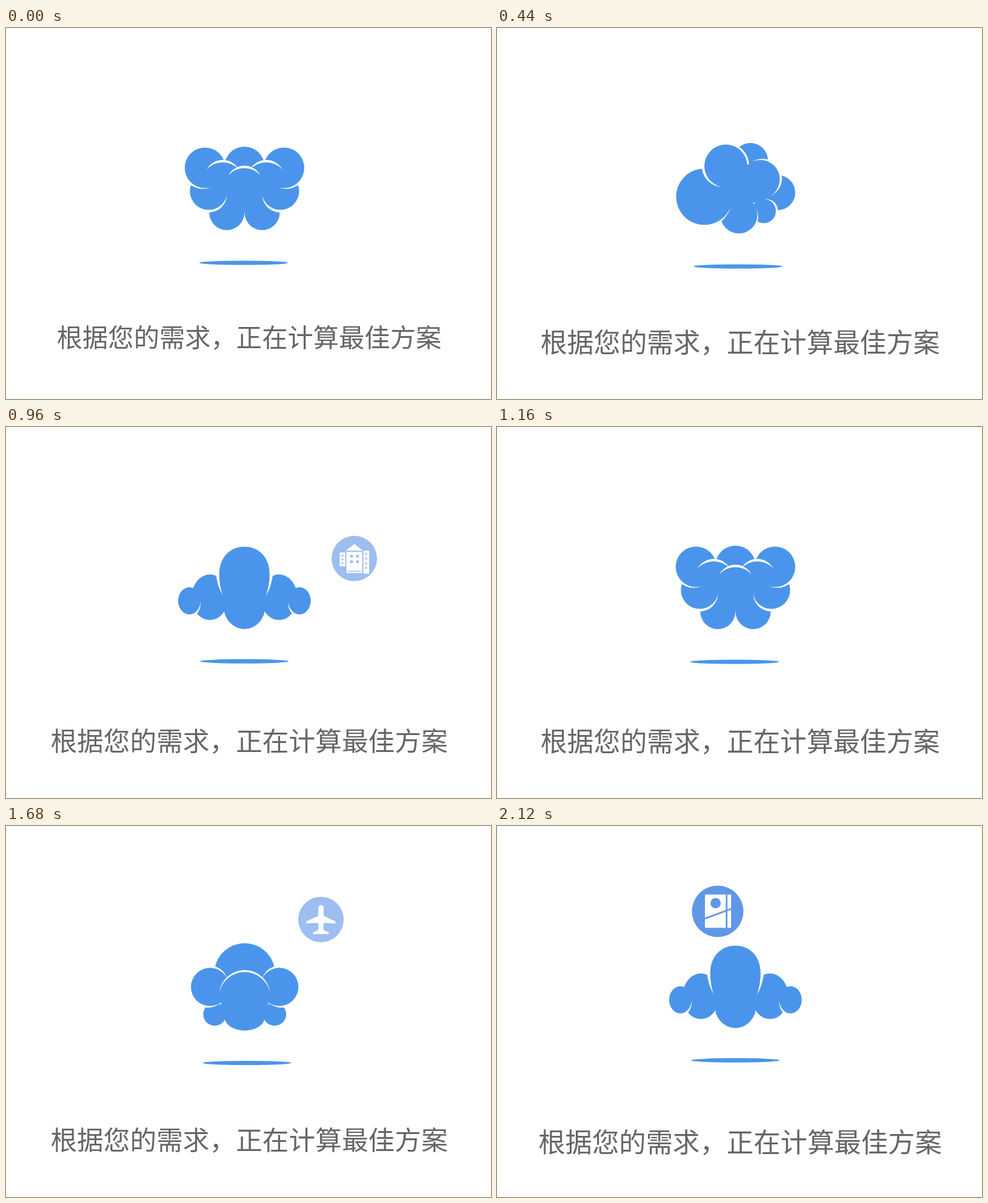
An HTML page with a canvas that plays this animation: 800 by 613 pixels, repeating every 2.16 s.

```html
<!DOCTYPE html>
<html lang="zh-CN">
<head>
<meta charset="utf-8">
<style>
html, body { margin: 0; width: 100%; height: 100%; overflow: hidden; background: #fff; }
canvas { display: block; }
</style>
</head>
<body>
<canvas id="stage" width="800" height="613"></canvas>
<script>
const ctx = document.getElementById('stage').getContext('2d');
const BLUE = '#4a95eb', WHITE = '#fff', ICON_RGB = [78, 139, 228];
const STEP = 40, FRAMES = 54, ICON_FRAMES = 9, POSE_CYCLE = 27;

function oval(x, y, rx, ry = rx, color = BLUE) {
  ctx.fillStyle = color;
  ctx.beginPath();
  ctx.ellipse(x, y, rx, ry, 0, 0, 7);
  ctx.fill();
}
function shape(d, color = BLUE) {
  ctx.fillStyle = color;
  ctx.fill(new Path2D(d));
}
function box(x, y, w, h, color = WHITE, r = 0) {
  ctx.fillStyle = color;
  ctx.beginPath();
  ctx.roundRect(x, y, w, h, r);
  ctx.fill();
}
function line(x0, y0, x1, y1, color, width = 2.5) {
  ctx.strokeStyle = color;
  ctx.lineWidth = width;
  ctx.beginPath();
  ctx.moveTo(x0, y0);
  ctx.lineTo(x1, y1);
  ctx.stroke();
}
// A lobe with a tapering white gap on the side facing the angle (degrees)
function lobe(x, y, rx, angle, gap, ry = rx) {
  const a = angle * Math.PI / 180;
  oval(x + gap * Math.cos(a), y + gap * Math.sin(a), rx, ry, WHITE);
  oval(x, y, rx, ry);
}
// White crescent arching over a horizontal chord
function crescent(x0, x1, y, rise, thick) {
  const half = (x1 - x0) / 2;
  const radius = h => (half * half + h * h) / (2 * h);
  const r1 = radius(rise), r2 = radius(rise - thick);
  shape(`M${x0} ${y}A${r1} ${r1} 0 0 1 ${x1} ${y}A${r2} ${r2} 0 0 0 ${x0} ${y}Z`, WHITE);
}
function mirrored(cx, draw) {
  draw();
  ctx.save();
  ctx.translate(2 * cx, 0);
  ctx.scale(-1, 1);
  draw();
  ctx.restore();
}

function wideCloud() {
  const cx = 393.4;
  oval(cx, 229, 33);
  mirrored(cx, () => {
    oval(364.3, 305, 29);
    oval(357, 249.5, 30);
    lobe(334.3, 269.5, 31, 98, 4.5);
    lobe(328.3, 231, 33.5, 160, 4);
  });
  box(364.5, 240, 58, 65, BLUE);
  box(345, 232, 97, 28, BLUE);
  mirrored(cx, () => crescent(331, 384, 233.5, 15.5, 4));
  crescent(367, 419.5, 243, 15.5, 4);
}

function sideCloud() {
  oval(418, 219, 29);
  oval(463, 272, 29);
  oval(377.5, 228, 38.5, 38.5, WHITE);
  lobe(440, 302.5, 20, 0, 3.5);
  lobe(399, 309, 30.5, 68, 3.5);
  lobe(342, 278.8, 46.5, 110, 5);
  lobe(377.5, 228, 35.5, 188, 4.5);
  lobe(434.5, 250, 32, -27, 4);
  oval(405, 265, 30);
  oval(428, 276, 13);
}

function domeCloud() {
  const cx = 393.7;
  oval(cx, 243.7, 50);
  oval(cx, 281, 41);
  mirrored(cx, () => oval(344.3, 311, 19));
  oval(cx, 316, 33.2, 22);
  mirrored(cx, () => {
    lobe(336.5, 266, 31.5, -110, 4.5);
    lobe(336.5, 266, 31.5, 142, 4.5);
  });
  crescent(352, 435.4, 275, 37, 3.3);
}

function tallCloud() {
  const cx = 393.3;
  mirrored(cx, () => {
    oval(336.3, 281.3, 30.3, 37.7);
    lobe(302.5, 287.2, 18.5, 90, 4.5, 22.5);
    shape('M346 240Q348 263 358.5 280L362 240Z', WHITE);
  });
  oval(cx, 296, 34.5, 38);
  shape('M351.8 243C351.8 216 369 197.8 393.3 197.8S434.8 216 434.8 243C434.8 262 430 275 428 281H358.6C356 275 351.8 262 351.8 243Z');
}

// first frame within the cycle, drawing, shadow centre
const poses = [
  [0, wideCloud, 392, 388],
  [6, sideCloud, 397.7, 394],
  [13, domeCloud, 397.5, 391.5],
  [20, tallCloud, 393.2, 387.2]
];

function car(tint) {
  shape('M-23 10V5Q-22 0 -14 -1L-10 -8Q-8 -13.5 3 -13.5Q13 -13.5 16 -8L20 -2Q24 0 24 6L23 10Z', WHITE);
  shape('M-8 -2L-5 -7Q-3 -9 1 -9V-2ZM4 -9Q10 -9 12 -6L14 -2H4Z', tint);
  for (const x of [-11, 14]) {
    oval(x, 9.5, 6.5, 6.5, tint);
    oval(x, 9.5, 5, 5, WHITE);
    oval(x, 9.5, 2, 2, tint);
  }
}
function suitcase(tint) {
  box(-9, -24, 18, 16, WHITE, 3);
  box(-5.5, -19, 11, 8, tint);
  box(-15.5, -10, 31, 35, WHITE, 5);
  line(-10.5, -2.7, 10.5, -2.7, tint);
  line(-10.5, 16, 10.5, 16, tint);
}
function building(tint) {
  shape('M-14 -13L0 -24L14 -13Z', WHITE);
  box(-13, -11, 26, 35);
  box(-24, -10, 9, 23);
  box(15, -13, 9.5, 38);
  for (const x of [-7, 3]) for (const y of [-6, 3]) box(x, y, 4.5, 4.5, tint);
  for (const y of [-6, 0, 6]) box(-21, y, 3, 3, tint);
  for (const y of [-9, -1, 7, 14]) box(18, y, 3, 3, tint);
  line(-11, 21, 11, 21, tint, 1.5);
}
function bed() {
  box(-24, -21, 5, 42.5, WHITE, 2);
  box(-21, 0, 44, 10.5);
  box(19, 1, 5, 20.5, WHITE, 1);
  oval(-13, -6.5, 5.5, 5.5, WHITE);
  shape('M-8 -8Q0 -8 7 -6.5H21Q24 -6 24 -2H-15Z', WHITE);
}
function plane() {
  mirrored(0, () => shape('M-.5 -24Q4.5 -24 4.5 -18V-6L24 3V6.5L4.5 5.5L4 17L13 21.5V24H-.5Z', WHITE));
}
function passport(tint) {
  box(-18.5, -24.5, 38, 48.5);
  oval(-3, -12, 7.5, 7.5, tint);
  line(13, -24.5, 13, 24, tint);
  line(-18.5, 10.5, 19.5, -3.5, tint);
}

// drawing, centre, largest radius
const icons = [
  [car, 208, 169, 48], [suitcase, 423, 127.4, 43.2], [building, 574.5, 217.3, 48],
  [bed, 193.5, 153, 48], [plane, 519.5, 154.5, 48], [passport, 364, 141, 48]
];

function drawIcon(frame) {
  const [glyph, x, y, peak] = icons[Math.floor(frame / ICON_FRAMES)];
  const phase = frame % ICON_FRAMES;
  const r = phase === 8 ? 42.5 : Math.min(peak, 11 * phase - 28.5);
  if (r <= 0) return;
  const alpha = Math.min(.9, .56 + .17 * (phase - 6));
  const tint = `rgb(${ICON_RGB.map(c => Math.round(255 - (255 - c) * alpha))})`;
  ctx.save();
  ctx.translate(x, y);
  ctx.scale(r / 37.5, r / 37.5);
  oval(0, 0, 37.5, 37.5, tint);
  glyph(tint);
  ctx.restore();
}

function drawCaption(frame) {
  // linear pulse that stays large after its last rise
  const rise = frame > 45 ? 1 : 1 - Math.abs(frame % 18 - 9) / 9;
  const s = 1 + .049 * rise;
  ctx.save();
  ctx.translate(401, 287);
  ctx.scale(s, s);
  ctx.font = '42.3px "Noto Sans CJK SC", "Noto Sans CJK", sans-serif';
  ctx.textAlign = 'center';
  ctx.fillStyle = '#666';
  ctx.fillText('根据您的需求，正在计算最佳方案', 0, 240);
  ctx.restore();
}

function draw(now) {
  const frame = Math.floor(now / STEP) % FRAMES;
  ctx.fillStyle = WHITE;
  ctx.fillRect(0, 0, 800, 613);
  const [, cloud, sx, sy] = poses.findLast(p => p[0] <= frame % POSE_CYCLE);
  cloud();
  oval(sx, sy, 73, 3.6);
  drawIcon(frame);
  drawCaption(frame);
}

const start = performance.now();
function tick() {
  draw(performance.now() - start);
  requestAnimationFrame(tick);
}
tick();
</script>
</body>
</html>
```
